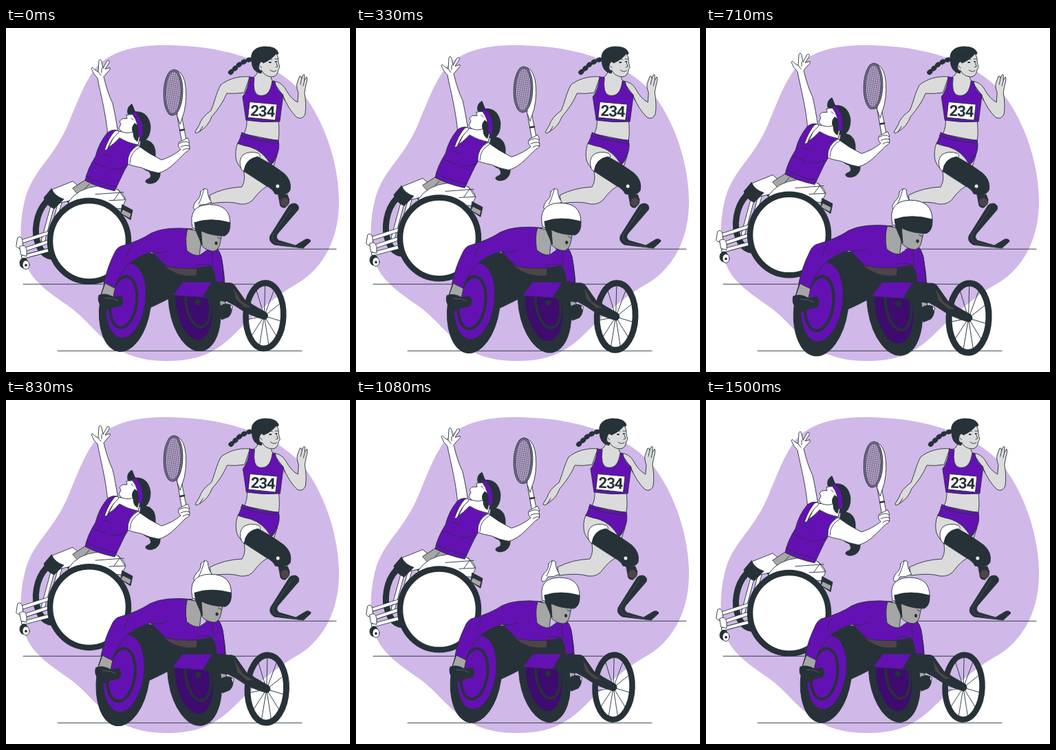
Write an HTML page that moves like this. It is 500 px wide and 500 px high and loops after 1540 ms.

```html
<!DOCTYPE html>
<html lang="en">
<head>
<meta charset="utf-8">
<title>Athletes</title>
<style>
  html, body { margin: 0; height: 100%; overflow: hidden; background: #fff; }
  svg { display: block; width: 100vw; height: 100vh; }
  g { stroke: #263238; stroke-width: .9; stroke-linecap: round; stroke-linejoin: round; fill: none; }
  .dark { fill: #263238; }
  .purple { fill: #6411b3; }
  .deep { fill: #3e0b6f; }
  .white { fill: #fff; }
  .pale { fill: #dbdbdb; }
  .grey { fill: #a6a6a6; }
  .brown { fill: #4d4549; }
  .bib { font: 700 22px Roboto, sans-serif; font-stretch: 75%; letter-spacing: -1px; text-anchor: middle; fill: #263238; stroke: none; }
</style>
</head>
<body>
<svg viewBox="0 0 500 500">
  <defs>
    <pattern id="strings" width="3" height="3" patternUnits="userSpaceOnUse" patternTransform="rotate(8)">
      <path d="M0 0H3M0 0V3" stroke="#263238" stroke-width=".7"/>
    </pattern>
  </defs>

  <path fill="#d0b8e8" d="M230 25C185 25 148 35 128 61C112 84 105 105 93 133C80 167 62 188 48 207C36 224 30 238 27 252C19 284 19 325 32 350C43 372 68 388 92 405C118 424 132 447 160 465C182 479 205 484 236 484C284 484 309 468 334 443C363 414 394 388 424 371C463 348 485 303 484 249C483 199 466 145 438 104C408 61 339 25 230 25Z"/>
  <g><path d="M25 372.300H374M290 321.300H480M75 469.300H430"/></g>

  <g id="runner">
    <path class="pale" d="M344 203Q350 219 343 231Q317 232 296 243L298 255Q326 251 341 256Q355 257 362 246Q371 234 383 228L390 197L360 185Z"/>
    <path class="white" d="M283 238Q288 231 293 235Q293 246 299 253Q290 258 282 257Q279 264 274 264Q270 260 277 251Q283 247 283 238Z"/>
    <path d="M288 234Q284 249 280 256"/>
    <path class="pale" d="M337 167Q332 179 335 193Q338 201 343 205L366 187L388 204L394 186Z"/>
    <path class="white" d="M342 205Q337 192 345 184Q354 178 367 182Q371 185 368 190L347 209Z"/>
    <path class="dark" d="M346 208Q348 190 366 187Q387 198 404 211Q416 222 413 236Q408 245 391 241Q388 234 378 229Z"/>
    <circle class="white" cx="395" cy="230" r="3"/>
    <path class="dark" d="M396 242L409 242L412 250L406 261Q398 262 398 254Z"/>
    <circle class="brown" cx="405" cy="253" r="6.500"/>
    <path class="dark" d="M411 259Q413 255 420 255Q427 257 425 264L395 299Q391 305 397 309L421 316L436 307Q442 306 443 310L432 320L390 315Q381 310 384 302Z"/>
    <path d="M415 261L388 301Q386 309 393 312L422 318" stroke="#5b6065" stroke-width=".6"/>
    <path class="pale" d="M350 133Q351 144 346 154L396 164Q398 150 396 134Z"/>
    <path class="purple" d="M343 152Q367 162 396 163Q399 176 392 189Q390 196 385 199Q374 179 355 173Q345 171 337 168Q341 160 343 152Z"/>
    <path d="M341 156Q366 166 396 167M385 198Q389 188 394 182"/>
    <path class="pale" d="M354 71C338 69 321 75 312 83C305 96 303 109 298 120Q284 130 281 141L275 151Q275 155 282 150Q294 143 299 129Q314 112 321 95Q333 96 346 94Z"/>
    <path d="M281 151L286 143"/>
    <path class="pale" d="M388 77Q400 78 406 88Q414 103 424 108L425 94Q421 84 424 78L427 70Q429 69 430 73Q432 66 434 68L434 76L437 71Q439 74 436 83L434 94Q437 111 435 125Q431 134 423 130Q411 119 402 97Z"/>
    <path d="M430 73L428 82M434 76L432 84M402 97L405 105"/>
    <path class="pale" d="M366 55Q368 69 358 72L359 96L376 103L390 91L390 78Q385 77 385 69Z"/>
    <path class="purple" d="M354 71L361 72Q358 96 368 98Q384 101 387 77L391 78Q393 91 403 97L398 136Q373 138 349 134L344 100Q352 91 354 71Z"/>
    <path d="M349 130Q374 134 398 132"/>
    <path class="white" d="M354.500 107.500L394 111L391.500 134L352 130Z"/>
    <text class="bib" transform="translate(372.500 128.500) rotate(3)">234</text>
    <path d="M354 46Q341 50 335 57L326 65" stroke-width="2.500"/>
    <path d="M354 46Q341 50 335 57L326 65" stroke-width="7" stroke-dasharray="1.500 6.500"/>
    <path class="dark" d="M357 46C355 33 365 27 377 27Q394 27 396 37L387 45L374 51L371 66Q357 64 357 46Z"/>
    <path class="pale" d="M368 53Q371 46 374 51Q386 46 393 37Q397 43 396 50L398 57L396 60Q395 71 386 71Q376 70 372 62Q366 62 368 53Z"/>
    <path d="M380 47Q384 43 387 46M391 45L395 45M393 51L395 56L392 57M384 61Q388 65 393 62M369 55L372 58"/>
    <path d="M383 50L385 50M392 49L393 49" stroke-width="2"/>
  </g>

  <g id="tennis">
    <ellipse cx="73" cy="288" rx="29" ry="45" transform="rotate(10 73 288)" stroke-width="9"/>
    <path d="M54 309L67 261M63 310L79 252" stroke-width="6"/>
    <path d="M54 309L67 261M63 310L79 252" stroke="#fff" stroke-width="4.300"/>
    <path class="white" d="M67 235L97 223L112 236L102 249L76 255Z"/>
    <path class="dark" d="M66 234L55 247Q58 258 70 263L84 249Q71 245 66 234Z"/>
    <path d="M25 310L62 298M28 322L64 310M25 333L66 322" stroke-width="6"/>
    <path d="M25 310L62 298M28 322L64 310M25 333L66 322" stroke="#fff" stroke-width="4.300"/>
    <path class="white" d="M17 305Q22 301 24 309L25 319Q19 323 15 318Z"/>
    <path class="white" d="M20 318Q28 313 30 323L30 332L22 330Z"/>
    <ellipse class="dark" cx="26" cy="342" rx="6" ry="7.500"/>
    <ellipse class="white" cx="29" cy="344.500" rx="5" ry="6.500"/>
    <circle class="dark" cx="29" cy="345" r="1.500"/>
    <path class="grey" d="M97 233L117 220L158 235L128 233Q113 234 104 241Z"/>
    <path d="M113 236L121 227"/>
    <path class="white" d="M91 253Q104 233 133 230L160 234Q170 239 174 250L168 263L92 258Z"/>
    <path class="dark" d="M169 257L184 265L181 279L167 270Z"/>
    <path class="grey" d="M170 264L182 270L180 277L167 270Z"/>
    <path d="M130 242L171 239M163 235L173 250L150 251M165 239L157 250"/>
    <ellipse class="white" cx="121" cy="310" rx="57" ry="58.800" stroke-width="8.500"/>

    <path class="dark" d="M188 122Q207 121 210 143Q210 157 203 163Q219 166 217 188Q214 202 224 210Q225 218 218 224Q208 229 203 224Q202 221 208 219Q213 216 208 209Q198 206 195 197Q191 184 196 166L186 150Z"/>
    <path class="white" d="M148 157C145 122 137 95 133 73Q127 68 124 59Q125 56 129 61L134 64L135 48Q137 44 139 49L141 59L147 48Q151 46 150 51L144 60L151 58Q153 60 149 63L142 71Q147 93 155 110Q159 127 163 153Z"/>
    <path d="M139 59L139 65M134 64L138 69"/>
    <path class="white" d="M188 125L181 126L175 127L176 132L169 132L165 136L167 140L164 146L168 151L161 150L148 176L178 172L192 170L195 158Q201 142 188 125Z"/>
    <path d="M182 131L185 134M168 151Q180 155 186 150"/>
    <path class="dark" d="M187 139Q195 141 193 158L191 165Q185 162 185 153Q181 145 187 139Z"/>
    <path class="purple" d="M178 125Q175 117 183 111Q186 121 190 124Q202 137 198 159L192 158Q194 139 184 126Z"/>
    <path class="dark" d="M177 125Q175 115 183 111Q186 117 187 123Z"/>
    <path class="purple" d="M147 153Q153 147 162 149Q151 160 146 176Q157 169 165 160Q176 167 191 170Q177 179 177 199Q172 207 169 214L158 237Q134 232 115 222Q118 206 130 187Q135 167 147 153Z"/>
    <path class="white" d="M158 150L162 149Q165 151 163 153Q153 161 147 177L143 178Q149 160 158 150Z"/>
    <path d="M117 216Q137 227 161 231M128 196L145 203M141 183L152 187M174 202Q160 207 152 205"/>

    <path class="white" d="M249 127L255 127L262 163L256 166Z"/>
    <path class="white" d="M248 126L253 140L259 122Q264 99 260 79Q256 62 244 61L249 126Z"/>
    <ellipse cx="243" cy="94" rx="12.500" ry="32" transform="rotate(2 243 94)" stroke-width="3.600"/>
    <ellipse cx="243" cy="94" rx="12.500" ry="32" transform="rotate(2 243 94)" style="fill:#bba5cf" stroke="#8575a2" stroke-width="1.800"/>
    <ellipse cx="243" cy="94" rx="11.500" ry="31" transform="rotate(2 243 94)" fill="url(#strings)"/>
    <path d="M253 149L259 148" stroke-width="2.500"/>
    <path class="white" d="M192 171Q207 183 226 192Q242 187 254 177Q248 171 252 166L264 160Q268 166 266 170Q269 178 261 181Q254 188 247 195Q234 208 222 211Q209 209 196 203Q184 201 177 198Q176 179 192 171Z"/>
    <path d="M180 197Q180 181 195 173M252 168Q261 163 266 167M254 173Q262 169 267 172M257 178Q263 174 267 176"/>
  </g>

  <g id="racer">
    <path class="purple" d="M301 317Q312 323 314 342Q319 371 317 397L305 396Q306 365 298 346Z"/>
    <path class="grey" d="M307 396L317 396L320 405L310 406Z"/>
    <path class="dark" d="M310 404Q318 398 326 402Q330 411 323 419L313 423Q307 414 310 404Z"/>
    <path class="white" d="M325 402L328.500 404L327 410Z"/>
    <ellipse class="dark" cx="274" cy="402" rx="36.500" ry="67" transform="rotate(-9 274 402)"/>
    <ellipse class="deep" cx="273" cy="401" rx="26" ry="52" transform="rotate(-9 273 401)"/>
    <ellipse cx="279" cy="400" rx="17" ry="34" transform="rotate(-9 279 400)" stroke-width="4"/>
    <circle class="dark" cx="279" cy="398" r="4"/>
    <ellipse class="dark" cx="174.500" cy="402" rx="36.500" ry="67.500" transform="rotate(8 174.500 402)"/>
    <path class="dark" d="M176 338Q195 324 219 329L239 348L299 345Q309 358 311 381L246 388Q226 399 210 406L198 346Z"/>
    <ellipse class="purple" cx="175.500" cy="396" rx="28" ry="54" transform="rotate(8 175.500 396)"/>
    <ellipse cx="172" cy="398" rx="19" ry="37" transform="rotate(8 172 398)" stroke-width="4"/>
    <path class="brown" d="M230 346L278 350L277 360Q251 364 230 346Z"/>

    <path class="purple" d="M168 318Q196 310 212 299Q232 289 271 293L264 323L281 331L301 317Q312 323 314 342L316 369L304 369Q305 358 298 346Q267 353 234 347L213 326Q189 333 177 346Q164 362 159 379L144 371Q149 348 158 330Q162 320 168 318Z"/>
    <path d="M213 326Q224 329 235 324M184 318Q177 323 177 333M300 320Q298 336 301 346M276 345Q289 342 298 346"/>
    <path class="grey" d="M264 293L279 296L283 314L281 331Q272 332 263 324Q260 306 264 293Z"/>
    <path class="grey" d="M279 295L284 317Q292 325 302 325Q308 323 310 316L313 302L300 288Z"/>
    <path class="dark" d="M274 290L283 291L285 316L279 303Z"/>
    <ellipse class="dark" cx="305" cy="313.500" rx="1.600" ry="2.200"/>
    <path d="M307 305L311 307"/>
    <path class="white" d="M271 291Q264 259 295 258Q326 258 325 286L318 292L280 293Z"/>
    <path class="dark" d="M274 284Q296 276 325 284Q326 299 317 303Q298 303 284 296Q274 297 274 284Z"/>

    <path class="grey" d="M146 371L160 378L157 392L140 388Z"/>
    <path class="dark" d="M137 388Q146 384 158 391L169 389Q174 397 169 403L158 405Q151 411 147 408Q135 402 136 392Z"/>
    <path d="M146 392L157 393L164 396" stroke="#747579" stroke-width=".6"/>

    <path d="M228 385L249 391"/>
    <path class="purple" d="M243 388L257 369L299 369L286 391Z"/>
    <path class="dark" d="M286 391L299 369L326 371L319 397Z"/>
    <ellipse cx="374.500" cy="417.500" rx="27" ry="47" transform="rotate(2 374.500 417.500)" stroke-width="8.500"/>
    <path id="spokes"/>
    <path class="dark" d="M321 371Q329 369 333 376L347 396L377 413Q382 419 375 423Q353 418 332 403L319 396Z"/>
    <path class="brown" d="M329 376L341 396L357 406L347 406L333 394Z"/>
    <circle class="dark" cx="374" cy="418" r="4.500"/>
  </g>
</svg>
<script>
  const LOOP = 1540, STEPS = 37;
  const byId = id => document.getElementById(id);
  const runner = byId('runner'), tennis = byId('tennis'), racer = byId('racer');

  byId('spokes').setAttribute('d', Array.from({ length: 11 }, (_, i) => {
    const a = (i + .3) / 11 * 2 * Math.PI;
    return `M374 418L${374.5 + 23 * Math.cos(a)} ${417.5 + 43 * Math.sin(a)}`;
  }).join(''));

  // Linear interpolation through values spaced evenly, one per tenth of the loop
  function track(values, p) {
    const i = Math.floor(p * 10), a = values[i];
    return a + (values[i + 1] - a) * (p * 10 - i);
  }
  const shake = [0, -1, 2, -4, 4, -4, 4, -4, 2, -1, 0];
  const beat = [1, 1.1, 1.05, 1, 1, 1.1, 1, 1, 1, 1, 1];

  function draw(now) {
    const step = Math.floor((now + 4) / LOOP * STEPS) % STEPS;
    const p = (step + .5) / STEPS;
    const rise = 10 * (1 - Math.abs(2 * p - 1));
    runner.setAttribute('transform', `translate(${track(shake, p)} 0)`);
    tennis.setAttribute('transform', `translate(0 ${-rise})`);
    racer.setAttribute('transform', `translate(271.5 364) scale(${track(beat, p)}) translate(-271.5 -364)`);
  }
  function tick() {
    draw(performance.now());
    requestAnimationFrame(tick);
  }
  tick();
</script>
</body>
</html>
```
